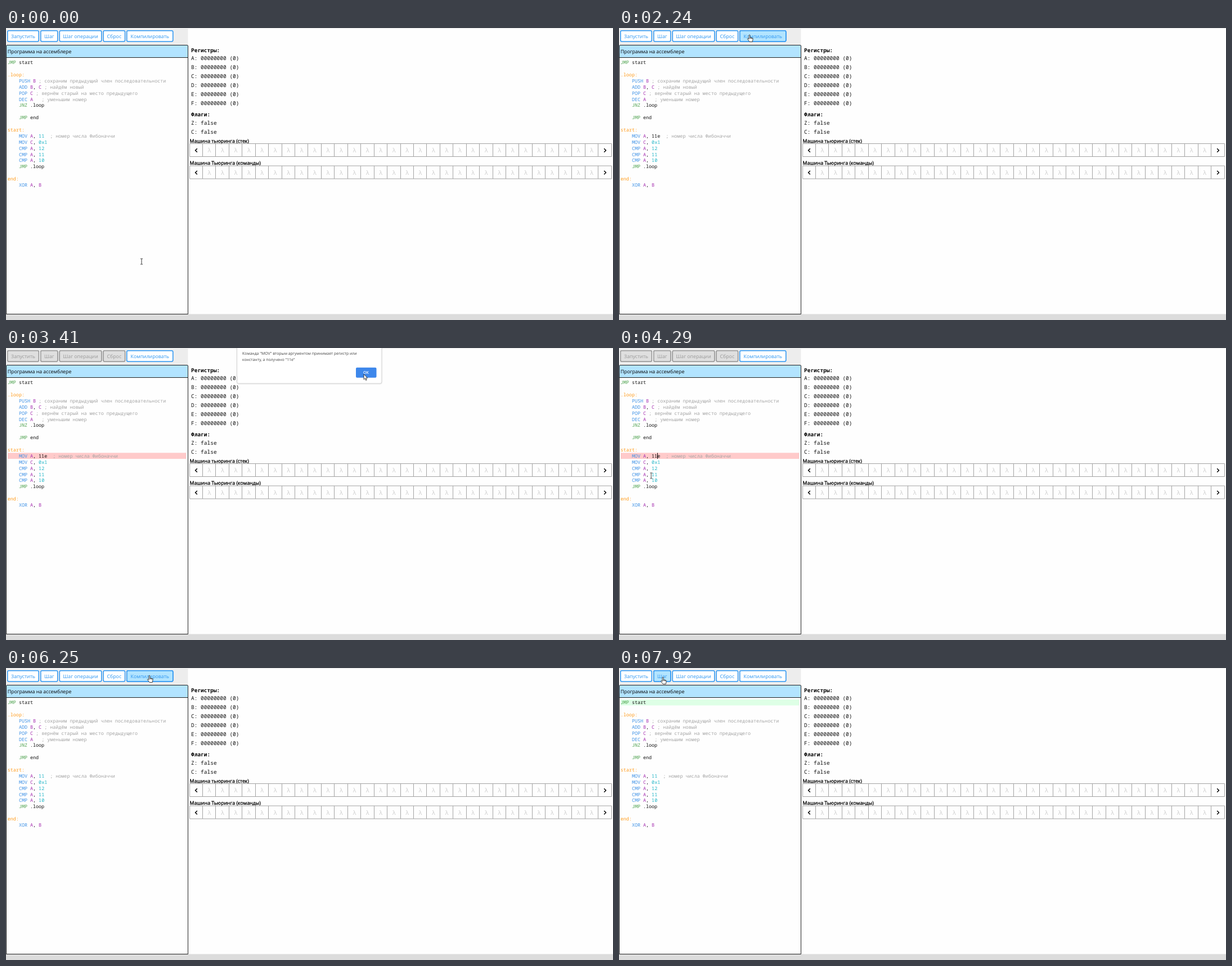
Recreate the animation shown at these times as an HTML page. Size 1079 by 519 pixels, loop 8 s.

```html
<!DOCTYPE html>
<html lang="ru">
<head>
<meta charset="utf-8">
<title>Ассемблер</title>
<style>
html, body { margin: 0; width: 100%; height: 100%; overflow: hidden; background: #fefefe; }
svg { display: block; width: 100%; height: 100%; }
text { white-space: pre; text-rendering: geometricPrecision; fill: #000; }
.ui { font: 8.75px "Open Sans", "Noto Sans", sans-serif; }
.title { stroke: #000; stroke-width: .3px; }
.code { font: 8.4px "Noto Sans Mono", "DejaVu Sans Mono", monospace; fill: #111; }
.reg { font: 9.5px "Noto Sans Mono", "DejaVu Sans Mono", monospace; fill: #111; }
.bold { font-weight: 700; fill: #000; }
.mid { text-anchor: middle; }
.lambda { font: 10.5px "Open Sans", "Noto Sans", sans-serif; fill: #ccc; }
.msg { font: 6.9px "Open Sans", "Noto Sans", sans-serif; fill: #333; }
.msg.head { font-size: 8.6px; }
.ok { font: 600 7px "Open Sans", "Noto Sans", sans-serif; fill: #fff; }

.jump { fill: #4fa350; }
.op { fill: #3f92e6; }
.rg { fill: #a52fb0; }
.num { fill: #1fb4c6; }
.label { fill: #ff9a1a; }
.note { fill: #a3a3a3; }

.btn { color: #2a95f2; }
.btn rect { stroke-width: 1.5px; }
.btn text { fill: currentColor; }
.lockable { animation: lock 8s step-end infinite; }

/* things that switch on and off at set times */
.step { opacity: 0; animation: 8s step-end infinite; }

@keyframes lock { 0%, 75.5% { color: #2a95f2 } 42.4% { color: #999 } }
@keyframes locked { 0%, 75.5% { opacity: 0 } 42.4% { opacity: 1 } }
@keyframes hover-compile { 0%, 42.3%, 79.2% { opacity: 0 } 27.3%, 72% { opacity: 1 } }
@keyframes hover-op { 0%, 94.4% { opacity: 0 } 87% { opacity: 1 } }
@keyframes hover-step { 0% { opacity: 0 } 94.6%, 100% { opacity: 1 } }
@keyframes good { 0%, 58.6% { opacity: 1 } 19.5% { opacity: 0 } }
@keyframes bad { 0%, 58.6% { opacity: 0 } 19.5% { opacity: 1 } }
@keyframes error-line { 0%, 58.6% { opacity: 0 } 42.4% { opacity: 1 } }
@keyframes active-line { 0% { opacity: 0 } 98.9%, 100% { opacity: 1 } }
@keyframes caret { 0%, 18.6%, 58.8%, 71.5% { opacity: 0 } 12%, 51.4%, 64.85% { opacity: 1 } }
@keyframes caret-typed { 0%, 26.1% { opacity: 0 } 19.5% { opacity: 1 } }
@keyframes beam { 0%, 45.6% { opacity: 1 } 26.4%, 70.3% { opacity: 0 } }
@keyframes arrow {
  0%, 27.3%, 45.6%, 72%, 87% { opacity: 0 }
  26.4%, 35.2%, 70.3%, 79.2% { opacity: 1 }
}
@keyframes hand { 0%, 35.2%, 79.2% { opacity: 0 } 27.3%, 72%, 87%, 100% { opacity: 1 } }
@keyframes ring { 0%, 41.3% { opacity: 0 } 30.6% { opacity: 1 } }

#alert { opacity: 0; animation: alert 8s linear infinite; }
@keyframes alert {
  0%, 30.5% { opacity: 0; transform: translateY(-4px) }
  31.6%, 42.2% { opacity: 1; transform: none }
  42.6% { opacity: .97; transform: translateY(-3.8px) }
  43.6%, 100% { opacity: 0; transform: translateY(-10px) }
}
#okFill { fill: #1a73e8; animation: ok-hover 8s step-end infinite; }
@keyframes ok-hover { 0% { fill: #1a73e8 } 40%, 100% { fill: #307fea } }

#pointer { animation: move 8s ease-in-out infinite; }
@keyframes move {
  0%, .75% { transform: translate(241px, 415px) }
  8% { transform: translate(75px, 184px); animation-timing-function: ease-out }
  10.4%, 18.75% { transform: translate(70px, 191px) }
  21.9% { transform: translate(75px, 261px) }
  28% { transform: translate(232px, 12px) }
  30.6% { transform: translate(232px, 12px); animation-timing-function: ease-in }
  32.5% { transform: translate(284.5px, 44.5px); animation-timing-function: linear }
  37% { transform: translate(560px, 57px); animation-timing-function: ease-out }
  40.6%, 43% { transform: translate(636px, 46.5px) }
  46.25%, 48.5% { transform: translate(68px, 203px) }
  50.75%, 51.5% { transform: translate(68.5px, 191px) }
  53% { transform: translate(55px, 222px) }
  55%, 64.5% { transform: translate(65.5px, 245px) }
  64.85% { transform: translate(65.5px, 255px) }
  66.75% { transform: translate(65.5px, 255px); animation-timing-function: ease-in }
  69.375% { transform: translate(219px, 75px); animation-timing-function: ease-out }
  73.5%, 78.1% { transform: translate(255px, 13px) }
  83.1%, 85.9% { transform: translate(190.5px, 45px) }
  87.9%, 90.6% { transform: translate(157px, 5px) }
  96.4%, 100% { transform: translate(78px, 16px) }
}
</style>
</head>
<body>
<svg viewBox="0 0 1079 519">
  <rect width="1079" height="1.2" fill="#ebebeb"/>
  <rect width="323.5" height="30" fill="#ededed"/>
  <rect y="508.5" width="1079" height="10.5" fill="#dcdcdc"/>
  <g id="buttons"></g>

  <path d="M0 52.5V32q0-1.5 1.5-1.5H322q1.5 0 1.5 1.5V52.5Z" fill="#b2e4ff"/>
  <path d="M.5 508.5V32q0-1.5 1.5-1.5H322q1.5 0 1.5 1.5V508.5ZM.5 52.5H323.5" fill="none" stroke="#222"/>
  <text class="ui" x="2.7" y="45">Программа на ассемблере</text>

  <rect class="step" style="animation-name:active-line" x="3" y="56" width="317.5" height="10.5" fill="#deffe6"/>
  <rect class="step" style="animation-name:error-line" x="3" y="186.3" width="317.5" height="10.8" fill="#ffcaca"/>
  <g id="code"></g>
  <rect class="step" style="animation-name:caret" x="68" y="186.5" width="1" height="10.5"/>
  <rect class="step" style="animation-name:caret-typed" x="73" y="186.5" width="1" height="10.5"/>

  <g id="state"></g>
  <g id="tapes"></g>

  <g id="alert">
    <rect x="409.5" y="-20" width="259.5" height="89" rx="4" fill="#000" opacity=".06"/>
    <rect x="410.5" y="-20" width="257.5" height="87" rx="3" fill="#fff" stroke="#c4c4c4" stroke-width=".8"/>
    <text class="msg head" x="420" y="-.8">Сообщение страницы</text>
    <text class="msg" x="420" y="15.5">Команда "MOV" вторым аргументом принимает регистр или</text>
    <text class="msg" x="420" y="27">константу, а получено "11e"</text>
    <rect id="okFill" x="622" y="38.8" width="36.5" height="18" rx="2"/>
    <g class="step" style="animation-name:ring" fill="none">
      <rect x="622.3" y="39.2" width="35.5" height="17.2" rx="1.5" stroke="#fff" stroke-width=".7"/>
      <rect x="621.3" y="38.2" width="37.5" height="19.2" rx="2.5" stroke="#1a5fc4" stroke-width="1.2"/>
    </g>
    <text class="ok mid" x="640" y="50.4">ОК</text>
  </g>

  <g id="pointer">
    <path class="step" style="animation-name:beam" d="M0-4.5V4.5M-2-5H-.7L0-4.4L.7-5H2M-2 5H-.7L0 4.4L.7 5H2" fill="none" stroke="#222" stroke-width=".9"/>
    <path class="step" style="animation-name:arrow" d="M0 0V9.4L2.2 7.4L3.7 10.9L5.1 10.3L3.7 6.9H6.7Z" fill="#fff" stroke="#111" stroke-width=".8"/>
    <path class="step" style="animation-name:hand" d="M-1 1.2c0-1.4 2-1.4 2 0v3.6l4 .9c1 .3 1.2 1 1.1 2l-.9 4.8h-5l-3.6-4.6c-.6-1 .7-1.8 1.5-1l.9 1Z M1 5v2M2.8 5.4v1.8M4.5 5.8v1.6" fill="#fff" stroke="#111" stroke-width=".8"/>
  </g>
</svg>

<script>
const fill = (id, html) => { document.getElementById(id).innerHTML = html; };
const text = (x, y, str, cls, style = '') =>
  `<text x="${x}" y="${y}" class="${cls}" style="${style}">${str}</text>`;

// toolbar: label, left, width, hover animation
const buttons = [
  ['Запустить', 2, 57],
  ['Шаг', 61, 31.5, 'hover-step'],
  ['Шаг операции', 94.5, 76, 'hover-op'],
  ['Сброс', 172.3, 40],
  ['Компилировать', 214, 83.5, 'hover-compile'],
];
fill('buttons', buttons.map(([label, x, w, hover], i) => {
  const box = (bg, anim) => `<rect x="${x + .75}" y="4.75" width="${w - 1.5}" height="19.2" rx="2.2"
    fill="${bg}" stroke="currentColor" ${anim ? `class="step" style="animation-name:${anim}"` : ''}/>`;
  const lockable = i < 4;
  return `<g class="btn ${lockable ? 'lockable' : ''}">${box('#fff')}
    ${lockable ? box('#dfdfdf', 'locked') : ''}${hover ? box('#b2e4ff', hover) : ''}
    ${text(x + w / 2, 17.8, label, 'ui mid')}</g>`;
}).join(''));

// program listing
const program = `JMP start

.loop:
    PUSH B ; сохраним предыдущий член последовательности
    ADD B, C ; найдём новый
    POP C ; вернём старый на место предыдущего
    DEC A   ; уменьшим номер
    JNZ .loop

    JMP end

start:
    MOV A, 11  ; номер числа Фибоначчи
    MOV C, 0x1
    CMP A, 12
    CMP A, 11
    CMP A, 10
    JMP .loop

end:
    XOR A, B`.split('\n');

const kinds = ['note', 'label', 'jump', 'op', 'rg', 'num'];
const token = /(;.*)|(^\S+:)|(\bJ[A-Z]+\b)|(\b[A-Z]{2,}\b)|(\b[A-F]\b)|(\b(?:0x)?\d+\b)/g;
const paint = line => line.replace(token, (s, ...groups) =>
  `<tspan class="${kinds[groups.findIndex(Boolean)]}">${s}</tspan>`);
const codeLine = (line, i, style) =>
  text(2.8, Math.round(64.3 + 10.88 * i), paint(line), 'code', style);

const edited = 12;
fill('code', program.map((line, i) => i !== edited ? codeLine(line, i) :
  `<g class="step" style="animation-name:good">${codeLine(line, i)}</g>
   <g class="step" style="animation-name:bad">${codeLine(line.replace('11', '11e'), i)}</g>`
).join(''));

// registers and flags
fill('state',
  text(329, 43, 'Регистры:', 'reg bold') +
  [...'ABCDEF'].map((r, i) => text(329, 57 + 16 * i, r + ': 00000000 (0)', 'reg')).join('') +
  text(329, 157, 'Флаги:', 'reg bold') +
  text(329, 171.5, 'Z: false', 'reg') + text(329, 187.5, 'C: false', 'reg'));

// tapes
const cell = 750 / 32, left = 326.5;
const tape = (title, y) => {
  let lines = `M${left} ${y}h750v23h-750Z`, signs = '';
  for (let i = 1; i < 32; i++) {
    lines += `M${Math.round(left + cell * i) - .5} ${y}v23`;
    if (i < 31) signs += text(left + cell * (i + .5), y + 15.5, 'λ', 'lambda mid');
  }
  const arrow = (i, d) => `M${left + cell * (i + .5) + 1.6 * d} ${y + 8.8}l${-3.2 * d} 3.2l${3.2 * d} 3.2`;
  return text(326.5, y - 1.8, title, 'ui title') +
    `<path d="${lines}" fill="none" stroke="#a3a3a3"/>${signs}
     <path d="${arrow(0, 1)}${arrow(31, -1)}" fill="none" stroke="#000" stroke-width="1.5"/>`;
};
fill('tapes', tape('Машина тьюринга (стек)', 205.5) + tape('Машина Тьюринга (команды)', 245));
</script>
</body>
</html>
```
